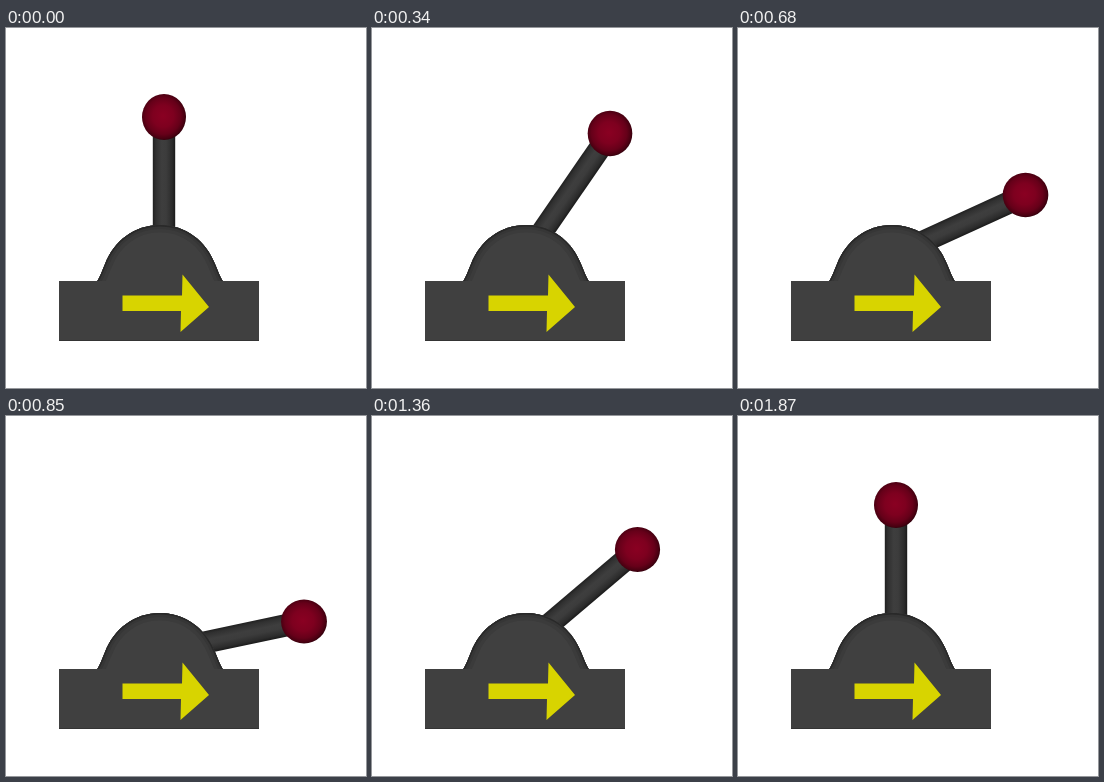
Recreate the animation shown at these times as an HTML page. Size 360x360 px, loop 2040 ms.

```html
<!DOCTYPE html>
<html lang="en">
<head>
<meta charset="utf-8">
<title>Lever</title>
<style>
  html, body { margin: 0; width: 100%; height: 100%; overflow: hidden; background: #fff; }
  svg { display: block; width: 100%; height: 100%; }
</style>
</head>
<body>
<svg viewBox="0 0 360 360">
  <defs>
    <linearGradient id="rodShade">
      <stop offset="0" stop-color="#202020"/>
      <stop offset=".14" stop-color="#303030"/>
      <stop offset=".4" stop-color="#3e3e3e"/>
      <stop offset=".6" stop-color="#3c3c3c"/>
      <stop offset=".86" stop-color="#2c2c2c"/>
      <stop offset="1" stop-color="#1a1a1a"/>
    </linearGradient>
    <radialGradient id="ballShade" cx=".48" cy=".48" r=".53">
      <stop offset="0" stop-color="#8a0022"/>
      <stop offset=".45" stop-color="#7e001f"/>
      <stop offset=".75" stop-color="#660019"/>
      <stop offset=".92" stop-color="#480011"/>
      <stop offset="1" stop-color="#30000b"/>
    </radialGradient>
    <path id="dome" d="M91 253.5C94 249 96 243 99 236C108 213 128 197 154 197C180 197 200 213 209 236C212 243 214 249 217 253.5"/>
    <clipPath id="domeClip"><use href="#dome"/></clipPath>
  </defs>

  <g id="lever">
    <rect id="rod" x="-11.2" width="22.4" fill="url(#rodShade)"/>
  </g>
  <ellipse id="ball" fill="url(#ballShade)"/>

  <use href="#dome" fill="#404040"/>
  <g clip-path="url(#domeClip)" fill="none">
    <use href="#dome" stroke="#3b3b3b" stroke-width="15"/>
    <use href="#dome" stroke="#363636" stroke-width="8"/>
    <use href="#dome" stroke="#292929" stroke-width="3"/>
  </g>
  <path d="M53 253H253V313H53Z" fill="#404040"/>
  <path d="M53 312.5H253" stroke="#343434"/>
  <path d="M116.5 267.5H176L176.5 246.5L203 279L174.5 304L175 283H116.5Z" fill="#d8d400"/>
</svg>
<script>
  const STEP = 170;
  const LOOP = 2040;
  const ROD_OVERLAP = 10;

  // Each pose: ball centre x, y, then the point where the rod leaves the dome.
  const poses = [
    [158, 89, 158, 200],
    [200, 91, 165.3, 200],
    [238, 105.5, 171.5, 202],
    [265.5, 133.5, 180, 206],
    [287.5, 167, 189, 212],
    [298, 205.5, 202, 225.8]
  ];

  const lever = document.getElementById("lever");
  const rod = document.getElementById("rod");
  const ball = document.getElementById("ball");

  function setAttrs(node, attrs) {
    for (const name in attrs) node.setAttribute(name, attrs[name]);
  }

  // Steps down through the poses, rests at both ends, then steps back.
  function poseAt(time) {
    const step = Math.floor((time % LOOP) / STEP);
    return poses[step < 6 ? step : Math.min(5, 11 - step)];
  }

  function draw(time) {
    const [x, y, baseX, baseY] = poseAt(time);
    const turn = Math.atan2(x - baseX, baseY - y);
    const length = Math.hypot(x - baseX, y - baseY);
    setAttrs(lever, { transform: `translate(${x} ${y}) rotate(${turn * 180 / Math.PI})` });
    setAttrs(rod, { y: 0, height: length + ROD_OVERLAP });
    setAttrs(ball, {
      cx: x,
      cy: y,
      rx: Math.hypot(22 * Math.cos(turn), 23 * Math.sin(turn)),
      ry: Math.hypot(23 * Math.cos(turn), 22 * Math.sin(turn))
    });
  }

  const start = performance.now();
  function tick() {
    draw(performance.now() - start);
    requestAnimationFrame(tick);
  }
  tick();
</script>
</body>
</html>
```
